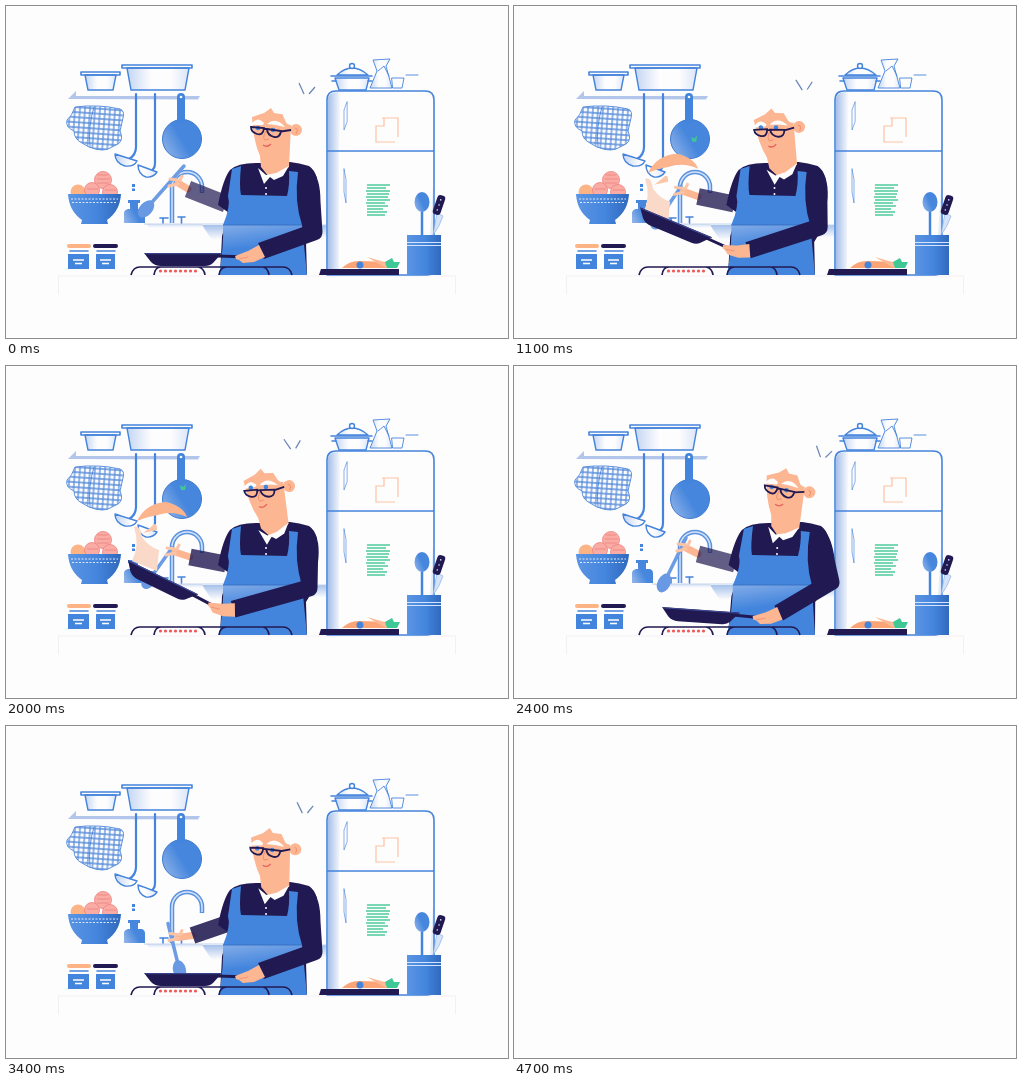
Animation of 502 by 332 pixels, one loop 5000 ms. Source, as an HTML page:

```html
<!DOCTYPE html>
<html lang="en">
<head>
<meta charset="utf-8">
<title>Cooking</title>
<style>
  html, body { margin: 0; width: 100%; height: 100%; overflow: hidden; background: #fefdfe; }
  svg { display: block; width: 502px; height: 332px; }
  .ln { fill: none; stroke: #4484dc; stroke-width: 1.6; stroke-linecap: round; stroke-linejoin: round; }
  .pot { fill: url(#steel); stroke: #4484dc; stroke-width: 1.4; stroke-linejoin: round; }
  .thin { stroke-width: .9; }
  .thick { stroke-width: 2.2; }
  .blue { fill: #4385dd; }
  .navy { fill: #211a52; }
  .skin { fill: #fcb692; }
  .white { fill: #fefdfe; }
  .navyLine { fill: none; stroke: #211a52; stroke-width: 1.7; }
</style>
</head>
<body>
<svg viewBox="0 0 502 332">
  <defs>
    <linearGradient id="steel"><stop offset="0" stop-color="#c3d6f3"/><stop offset=".4" stop-color="#fefdfe"/><stop offset=".7" stop-color="#fefdfe"/><stop offset="1" stop-color="#dbe6f8"/></linearGradient>
    <linearGradient id="side"><stop offset="0" stop-color="#a5bfe9"/><stop offset="1" stop-color="#fefdfe"/></linearGradient>
    <linearGradient id="deep"><stop offset="0" stop-color="#5b95e4"/><stop offset=".55" stop-color="#4485dd"/><stop offset="1" stop-color="#3069bd"/></linearGradient>
    <linearGradient id="disc" x1="0" y1=".8" x2="1" y2=".2"><stop offset="0" stop-color="#8db2e8"/><stop offset=".5" stop-color="#4686dd"/></linearGradient>
    <linearGradient id="skirt" x1="0" y1="0" x2=".25" y2="1"><stop offset="0" stop-color="#84ade8"/><stop offset=".5" stop-color="#4385dd"/></linearGradient>
    <linearGradient id="shade" x2="0" y2="1"><stop offset="0" stop-color="#a6c2ec"/><stop offset="1" stop-color="#fefdfe"/></linearGradient>
    <pattern id="check" width="5" height="5" patternUnits="userSpaceOnUse" patternTransform="rotate(4)">
      <path class="white" d="M0 0H5V5H0Z"/><path d="M0 1H5M1 0V5" stroke="#5b8fdb" stroke-width="1.3"/>
    </pattern>
    <clipPath id="above"><path d="M0 0H502V269.5H0Z"/></clipPath>
  </defs>
  <g id="scene">
    <path d="M52.500 288V270H449.500V288" fill="none" stroke="#f3f0f3"/>

    <!-- shelf and hanging tools -->
    <path d="M62 93L70 85V90H194L192 93.500Z" fill="#b1c6ea"/>
    <path class="pot" d="M79 69H110L107 84H82Z"/>
    <path class="pot" d="M121 62H183L179 84H125Z"/>
    <path class="ln" d="M75 66H114V69H75ZM116 59H186V62H116Z"/>
    <path class="ln thick" d="M130 88V141Q130 149 123 153M149 88V157Q149 164 143 166"/>
    <path class="pot" d="M109 148L131 155Q128 161 119 160Q109 157 109 148ZM132 159L151 166Q147 172 140 171Q132 168 132 159Z"/>
    <circle cx="176" cy="133" r="19.500" fill="url(#disc)" stroke="#3d7ad0"/>
    <rect class="blue" x="171" y="87" width="8" height="31" rx="4"/>
    <circle class="white" cx="175" cy="91" r="1.300"/>
    <path d="M69 101Q92 98 114 103Q119 105 117 112L114 125Q118 134 112 138L106 141Q98 147 83 141L76 137Q68 133 68 125Q59 121 61 114Q66 110 69 101Z" fill="url(#check)" stroke="#5b91dd"/>
    <path class="ln thin" d="M88 101Q82 120 84 141"/>

    <!-- fruit, bottle, tap, tins -->
    <circle cx="72" cy="186" r="7.500" fill="#fcb487"/>
    <g fill="#f9aca4" stroke="#ef7f7f" stroke-width=".8">
      <circle cx="97" cy="174" r="8.500"/><circle cx="86" cy="184" r="7.500"/><circle cx="104" cy="186" r="7.500"/>
      <path d="M91 173H104M92 169H102M91 177H103M81 183H92M99 184H110" fill="none"/>
    </g>
    <path d="M62 188H115Q114 205 101 214L102 218H75L76 214Q63 205 62 188Z" fill="url(#deep)"/>
    <path d="M65 193H112M66 196.500H111" stroke="#dbe8fa" stroke-dasharray="2 1.500"/>
    <path class="blue" d="M126 178H129V181H126ZM126 182.500H129V185H126Z"/>
    <path d="M122 194H134V197H132V203H136Q139 204 139 207V217H118V207Q118 204 122 203H124V197H122Z" fill="url(#disc)"/>
    <path d="M196 219H222L218 234H206Z" fill="url(#shade)"/>
    <path d="M140 218H196V222H144Z" fill="url(#shade)" opacity=".5"/>
    <path d="M296 219H320V232H300Z" fill="url(#shade)"/>
    <path d="M138 218H222M296 219H320" stroke="#c4d3ec"/>
    <path d="M166 217V181A15 15 0 0 1 196 181V187" fill="none" stroke="#5b92df" stroke-width="4.500"/>
    <path d="M166 217V181A15 15 0 0 1 196 181V186" fill="none" stroke="#d5e3f8" stroke-width="1.500"/>
    <path class="ln" d="M154 212H162M172 211H179M175.500 211V217M157 212V217"/>
    <rect x="61" y="238" width="24" height="4" rx="2" fill="#fcb487"/>
    <rect class="navy" x="87" y="238" width="25" height="4" rx="2"/>
    <path class="ln" d="M64 245H82M91 245H109"/>
    <path class="blue" d="M62 248H83V263H62ZM90 248H109V263H90Z"/>
    <path d="M67 254H78M69 257.500H76M94 254H105M96 257.500H103" stroke="#fefdfe" stroke-width="1.500"/>

    <!-- fridge and things on it -->
    <rect x="321" y="85" width="107" height="184" rx="9" fill="#fefdfe"/>
    <path d="M322 94Q322 87 330 86H335L333 145V268H322Z" fill="url(#side)"/>
    <path d="M422 268H427V180Z" fill="#e2ebf9"/>
    <path class="ln" d="M321 269V94Q321 85 330 85H419Q428 85 428 94V262Q428 269 421 269H321M321 145H428"/>
    <path class="ln thin" d="M341 96L338 104V124L341 116ZM338 163V186L340 197V174Z" stroke-opacity=".7"/>
    <path d="M376 112H392V131M389 136H370V120H378V112" fill="none" stroke="#fbc3a2" stroke-width="1.200"/>
    <path d="M361 179H384M361 182H380M360 185H384M361 188H383M360 191H382M361 194H384M360 197H379M361 200H382M361 203H377M361 206H381M361 209H379" stroke="#4dcb9c" stroke-width="1.500"/>
    <path class="pot" d="M329 72H363L360 84H333ZM331 69Q346 55 362 69Z"/>
    <path class="ln" d="M325 70H366M326 75H330M362 75H366"/>
    <circle class="pot" cx="346" cy="60" r="2.500"/>
    <path class="pot thin" d="M367 54L384 53L380 60L386 82H364L371 65Z"/>
    <path class="ln thin" d="M372 65L378 60L383 70M386 72H398L396 82H387ZM400 69H412"/>

    <!-- board and utensils -->
    <path class="navy" d="M315 263H393V269H313Z"/>
    <path d="M336 262Q344 254 355 255L382 256L381 262Z" fill="#fba577"/>
    <path d="M361 251L385 258L380 262Z" fill="#fcb994"/>
    <path d="M379 256L386 252L388 256L394 256L391 262H381Z" fill="#3fc895"/>
    <circle class="blue" cx="354" cy="259" r="3.500"/>
    <path d="M416 203V230" stroke="#4385dd" stroke-width="2.500"/>
    <ellipse cx="416" cy="196" rx="7.500" ry="10" fill="url(#disc)"/>
    <path d="M431 207L437 210Q433 222 427 229Z" fill="#d5e3f7" stroke="#8ab0e7" stroke-width=".7"/>
    <g transform="rotate(19 433 199)">
      <rect class="navy" x="429" y="189" width="8" height="20" rx="3"/>
      <path d="M433 193V206" stroke="#fefdfe" stroke-width="1.300" stroke-dasharray="1.300 4"/>
    </g>
    <rect x="401" y="229" width="34" height="40" fill="url(#deep)"/>
    <path d="M401 236.500H435M401 239.500H435" stroke="#d4e4fa"/>

    <g clip-path="url(#above)">
      <!-- spoon and far arm -->
      <path id="shaft" stroke="#6c9de4" stroke-width="3.500" stroke-linecap="round"/>
      <ellipse id="scoop" rx="10" ry="6.500" fill="#6899e2"/>
      <path id="farHand" fill="none" stroke="#fcb692" stroke-width="7" stroke-linecap="round"/>
      <path id="fingers" fill="none" stroke="#fcc4a6" stroke-width="3" stroke-linecap="round"/>
      <path id="farArm" fill="none" stroke="#211a52" stroke-width="17"/>

      <!-- body -->
      <g id="body">
        <path class="navy" d="M255 157Q232 156 224 164Q217 173 212 199L223 207L216 230L214 269H301L300 236L306 226L311 172Q308 163 303 160Q293 157 284 156Z"/>
        <path class="blue" d="M226 163L235 160Q233 180 235 189L281 190Q284 178 283 165L292 166Q288 195 296 219H217Q225 200 222 190Z"/>
        <path d="M217 219H296L301 269H213Q218 240 217 219Z" fill="url(#skirt)"/>
        <path d="M217 219H296" stroke="#3269bb" stroke-width=".8"/>
        <g class="white"><circle cx="260" cy="182" r="1"/><circle cx="260" cy="188" r="1"/></g>
      </g>
      <g id="head">
        <path class="white" d="M244 113Q248 102 262 103Q290 98 294 118L284 126L246 118Z"/>
        <path class="skin" d="M246 111L258 107L265 102L268 107L281 109L285 119L283 161L263 171L255 161L254 150Q247 134 246 111Z"/>
        <circle class="skin" cx="290" cy="124" r="6"/>
        <path class="white" d="M276 107L288 109L288 118Q281 121 279 114Z"/>
        <path class="white" d="M246 117Q252 110 258 117L257 119L246 119ZM261 118Q270 110 279 121L270 119Z"/>
        <path d="M260 125Q256 132 259 134L263 133" fill="none" stroke="#f18f70"/>
        <path d="M257 139Q261 142 265 138" fill="none" stroke="#e8605c" stroke-width="1.300"/>
        <path d="M289 122Q293 123 290 128" fill="none" stroke="#f18f70"/>
        <g id="eyes" class="blue"><circle cx="252" cy="122" r="2.300"/><circle cx="267" cy="124" r="2.300"/></g>
        <path d="M245 121L258 122Q257 130 251 128Q245 126 245 121ZM261 123L275 125Q274 132 268 131Q261 129 261 123ZM258 123H261M275 125.500L285 124" fill="none" stroke="#211a52" stroke-width="1.800"/>
        <path class="white" d="M252 162L260 169L270 167L283 160L277 170L268 174L264 171L258 178Z"/>
        <path d="M293 77L298 88M303 88L309 81" stroke="#6c88b7" stroke-width="1.300"/>
      </g>

      <!-- food, pan, near arm -->
      <g id="food">
        <path d="M128 161Q134 158 136 171Q143 181 153 184L151 205L126 195Q134 179 128 161Z" fill="#fbd9c8"/>
        <path d="M131 155Q140 137 160 136Q177 140 181 151Q166 144 152 149Q140 151 131 155Z" fill="#fcb48d"/>
        <path d="M145 161Q151 154 151 164L137 167Z" fill="#fcc6a8"/>
        <path d="M174 119L177 121L180 118L179 124H175Z" fill="#3fc895"/>
      </g>
      <g class="pan">
        <path class="navy" d="M0 0H78L69 10Q66 13 61 13H17Q11 13 7 9Z"/>
        <path d="M1 .7H78" stroke="#3d4d98"/>
        <path d="M74 3L104 4" stroke="#211a52" stroke-width="3" stroke-linecap="round"/>
      </g>
      <path id="nearArm" fill="none" stroke="#211a52" stroke-width="17" stroke-linejoin="round" stroke-linecap="butt"/>
      <g class="pan">
        <path class="skin" d="M91 3L104 -2L115 -8L121 4L110 9L99 10L95 7L92 6Z"/>
        <path d="M95 6L104 4" stroke="#f18f70" stroke-width=".8"/>
      </g>
    </g>

    <!-- burner -->
    <path class="navyLine" d="M125 269Q127 261 134 261H277Q284 261 286 269M148 269Q149 261 155 261M192 261Q198 262 199 269M213 269Q214 261 221 261M257 261Q262 262 263 269"/>
    <path d="M154.500 265H191" stroke="#ef5a5a" stroke-width="3.200" stroke-linecap="round" stroke-dasharray="0 5"/>
  </g>
</svg>
<script>
const $ = id => document.getElementById(id);
const set = (el, name, value) => el.setAttribute(name, value);
const pans = document.querySelectorAll('.pan');

// lean, head turn, pan x y angle, wrist, hand, spoon, shaft top, elbow, toss, sleeve opacity
const ready = [0, 0, 138, 247, 0, 182, 183, 172, 177, 140, 203, 178, 160, 308, 226, 0, .7];
const hold = [4, 5, 148, 241, 4, 184, 188, 172, 182, 150, 217, 172, 172, 317, 216, 0, .7];
const toss = [0, -10, 122, 194, 26, 184, 191, 169, 186, 143, 214, 166, 182, 303, 222, 1, .8];
const stirL = [0, -3, 138, 247, 0, 179, 208, 166, 208, 154, 242, 158, 190, 308, 226, 0, .75];
const stirR = [0, 0, 138, 247, 0, 194, 211, 178, 215, 193, 246, 166, 205, 308, 226, 0, 1];
const keys = [
  [0, ready], [200, hold], [400, toss], [700, hold], [800, hold], [1200, toss], [1500, hold],
  [1600, hold], [2000, toss], [2400, hold], [2600, stirL], [2800, stirL], [3200, stirR],
  [3600, stirL], [4000, stirR], [4400, stirL], [4800, stirR]
];

function poseAt(t) {
  const i = keys.findIndex(k => k[0] > t);
  const [t0, a] = keys[i - 1], [t1, b] = keys[i];
  const u = (t - t0) / (t1 - t0), e = u * u * (3 - 2 * u);
  return a.map((v, n) => v + (b[n] - v) * e);
}

function draw(now) {
  const t = Math.floor(now % 5000 / 100) * 100;
  const visible = t < 4700;
  set($('scene'), 'visibility', visible ? 'visible' : 'hidden');
  if (visible) {
    const [lean, turn, px, py, angle, wx, wy, hx, hy, sx, sy, tx, ty, ex, ey, lift, shade] = poseAt(t);
    const k = lean / 109;
    set($('body'), 'transform', `matrix(1 0 ${-k} 1 ${k * 269} 0)`);
    set($('head'), 'transform', `translate(${lean * .8 - 2 * lift} 0) rotate(${turn} 265 150)`);
    set($('eyes'), 'transform', `translate(0 ${-3 * lift})`);

    for (const pan of pans) set(pan, 'transform', `translate(${px} ${py}) rotate(${angle})`);
    const r = angle * Math.PI / 180;
    const gx = px + 117 * Math.cos(r), gy = py + 117 * Math.sin(r) - 2;
    set($('nearArm'), 'd', `M${300 + lean} 170Q${306 + lean} 176 ${(304 + lean + ex) / 2} 196L${ex} ${ey}L${gx} ${gy}`);

    set($('shaft'), 'd', `M${tx} ${ty}L${sx} ${sy}`);
    const tilt = Math.atan2(sy - ty, sx - tx) * 180 / Math.PI;
    set($('scoop'), 'transform', `translate(${sx} ${sy}) rotate(${tilt})`);
    set($('farHand'), 'd', `M${hx} ${hy}L${wx} ${wy}`);
    set($('fingers'), 'd', `M${hx} ${hy - 3}l-8 -1M${hx} ${hy + 1}l-9 2M${hx + 2} ${hy - 3}l2 -4`);
    set($('farArm'), 'd', `M${wx} ${wy}L${220 + lean / 3} 198`);
    set($('farArm'), 'stroke-opacity', shade);

    set($('food'), 'visibility', lift > .4 ? 'inherit' : 'hidden');
    set($('food'), 'transform', `translate(${(1 - lift) * 20} ${(1 - lift) * 75})`);
  }
  requestAnimationFrame(draw);
}
requestAnimationFrame(draw);
</script>
</body>
</html>
```
